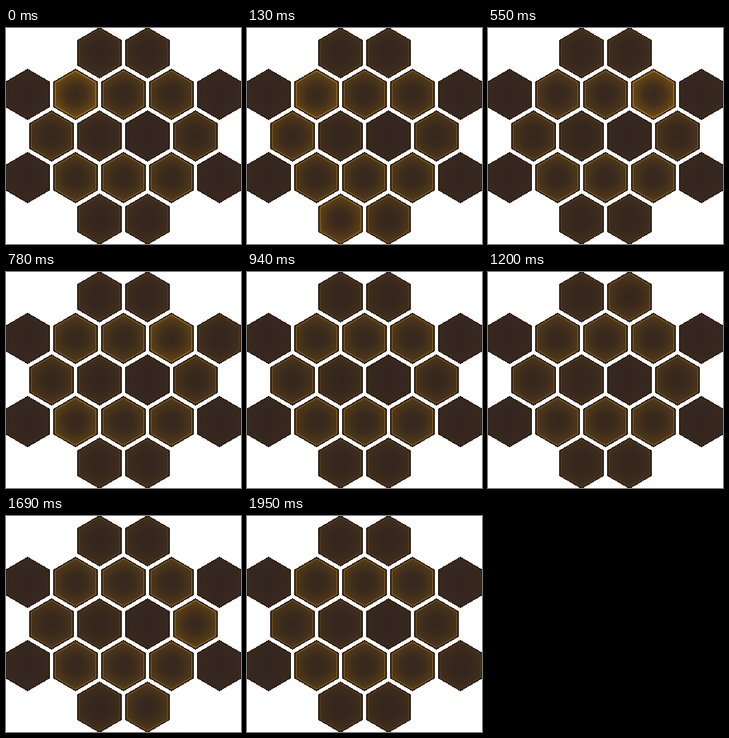
An HTML page without scripts for the animation above (2080 ms loop, 294x270 px).

```html
<!DOCTYPE html>
<html lang="en">
<head>
<meta charset="utf-8">
<title>Honeycomb glow</title>
<style>
html, body { margin: 0; width: 100%; height: 100%; overflow: hidden; background: #fff; }
svg { display: block; width: 294px; height: 270px; }

.glow { opacity: var(--o); }
.pulse { --p: 1; opacity: 0; animation: 2080ms step-end var(--t, 0ms) infinite; }
.soft { --p: .5; }
.quick { animation-name: quick; }
.slow { animation-name: slow; }
.tail { animation-name: tail; }
.blink { animation-name: blink; }

/* holds alternate between 30 and 100 ms */
@keyframes quick {
  0% { opacity: calc(var(--p) * .42); }
  1.4423% { opacity: calc(var(--p) * .36); }
  6.25% { opacity: calc(var(--p) * .28); }
  7.6923% { opacity: calc(var(--p) * .2); }
  12.5%, 100% { opacity: 0; }
}
@keyframes slow {
  0% { opacity: calc(var(--p) * .42); }
  4.8077% { opacity: calc(var(--p) * .28); }
  6.25% { opacity: calc(var(--p) * .25); }
  11.0577% { opacity: calc(var(--p) * .22); }
  12.5%, 100% { opacity: 0; }
}
@keyframes tail {
  0% { opacity: 0; }
  87.5% { opacity: .28; }
  88.9423% { opacity: .2; }
  93.75%, 100% { opacity: .12; }
}
@keyframes blink {
  0% { opacity: 0; }
  87.5% { opacity: .2; }
  88.9423% { opacity: .12; }
  93.75%, 100% { opacity: 0; }
}
</style>
</head>
<body>
<svg viewBox="0 0 294 270">
  <defs>
    <radialGradient id="body">
      <stop offset="0" stop-color="#32251f"/>
      <stop offset="1" stop-color="#37281f"/>
    </radialGradient>
    <radialGradient id="amber" gradientUnits="userSpaceOnUse" cx="0" cy="0" r="31">
      <stop offset="0" stop-color="#a87408" stop-opacity=".08"/>
      <stop offset=".45" stop-color="#a87408" stop-opacity=".2"/>
      <stop offset="1" stop-color="#b87d06" stop-opacity=".62"/>
    </radialGradient>
    <path id="hex" d="M0-32L27.7-16V16L0 32L-27.7 16V-16Z"/>
    <g id="cell">
      <use href="#hex" fill="#2b1f18" shape-rendering="crispEdges"/>
      <use href="#hex" transform="scale(.92)" fill="url(#body)" stroke="#46331f" stroke-width=".8"/>
    </g>
    <g id="lit">
      <use href="#hex" transform="scale(.92)" fill="url(#amber)" stroke="#ffba20" stroke-width="1.15"/>
    </g>
    <g id="pair">
      <use href="#cell" x="117"/>
      <use href="#cell" x="177"/>
    </g>
    <g id="five">
      <use href="#cell" x="27"/>
      <use href="#cell" x="87"/>
      <use href="#cell" x="147"/>
      <use href="#cell" x="207"/>
      <use href="#cell" x="267"/>
    </g>
  </defs>

  <use href="#pair" y="31"/>
  <use href="#five" y="83"/>
  <use href="#pair" y="135"/>
  <use href="#cell" x="57" y="135"/>
  <use href="#cell" x="237" y="135"/>
  <use href="#five" y="187"/>
  <use href="#pair" y="239"/>

  <!-- steady light -->
  <g class="glow" style="--o:.36">
    <use href="#lit" x="87" y="83"/>
    <use href="#lit" x="147" y="83"/>
    <use href="#lit" x="207" y="83"/>
    <use href="#lit" x="87" y="187"/>
    <use href="#lit" x="147" y="187"/>
    <use href="#lit" x="207" y="187"/>
  </g>
  <g class="glow" style="--o:.28">
    <use href="#lit" x="57" y="135"/>
    <use href="#lit" x="237" y="135"/>
  </g>
  <g class="glow" style="--o:.12">
    <use href="#lit" x="117" y="31"/>
    <use href="#lit" x="177" y="31"/>
    <use href="#lit" x="117" y="135"/>
    <use href="#lit" x="117" y="239"/>
    <use href="#lit" x="177" y="239"/>
  </g>

  <!-- flashes -->
  <use class="pulse quick" href="#lit" x="87" y="83"/>
  <use class="pulse slow soft" style="--t:30ms" href="#lit" x="57" y="135"/>
  <use class="pulse quick" style="--t:130ms" href="#lit" x="117" y="239"/>
  <use class="pulse quick soft" style="--t:130ms" href="#lit" x="177" y="239"/>
  <use class="pulse slow" style="--t:550ms" href="#lit" x="207" y="83"/>
  <use class="pulse quick soft" style="--t:650ms" href="#lit" x="267" y="83"/>
  <use class="pulse quick soft" style="--t:650ms" href="#lit" x="87" y="187"/>
  <use class="pulse quick" style="--t:1040ms" href="#lit" x="177" y="31"/>
  <use class="pulse quick soft" style="--t:1300ms" href="#lit" x="27" y="83"/>
  <use class="pulse slow" style="--t:1460ms" href="#lit" x="177" y="239"/>
  <use class="pulse slow" style="--t:1590ms" href="#lit" x="237" y="135"/>
  <use class="pulse tail" href="#lit" x="267" y="187"/>
  <use class="pulse blink" href="#lit" x="27" y="187"/>
  <use class="pulse blink" href="#lit" x="147" y="83"/>
</svg>
</body>
</html>
```
